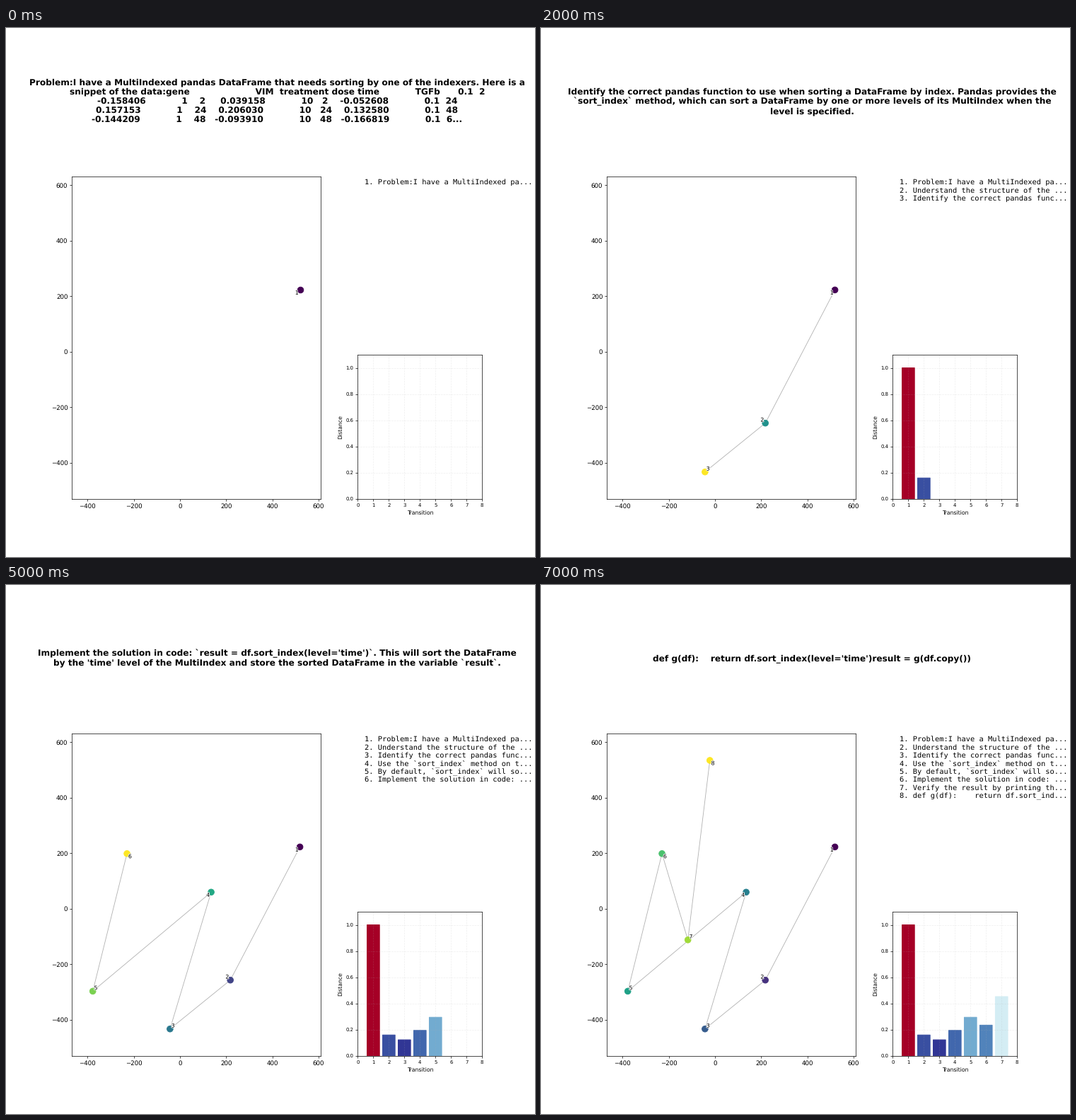
Animation of 748x748 px, one loop 8000 ms. Source, as a matplotlib script:

```python
import matplotlib.pyplot as plt
import matplotlib.patheffects as pe
import numpy as np
from matplotlib.animation import FuncAnimation

SIZE, INCHES = 748, 12

plt.rcParams["font.family"] = "DejaVu Sans"
plt.rcParams["text.hinting"] = "none"


def spaced(*parts):
    """Join words with the given numbers of spaces between them."""
    return "".join(" " * p if isinstance(p, int) else p for p in parts)


PROBLEM = "\n".join([
    "Problem:I have a MultiIndexed pandas DataFrame that needs sorting by "
    "one of the indexers. Here is a",
    spaced("snippet of the data:gene", 22, "VIM", 2, "treatment dose time",
           12, "TGFb", 6, "0.1", 2, "2"),
    spaced("-0.158406", 12, "1", 4, "2", 5, "0.039158", 12, "10", 3, "2", 4,
           "-0.052608", 12, "0.1", 2, "24"),
    spaced("0.157153", 12, "1", 4, "24", 4, "0.206030", 12, "10", 3, "24", 4,
           "0.132580", 12, "0.1", 2, "48"),
    spaced("-0.144209", 12, "1", 4, "48", 3, "-0.093910", 12, "10", 3, "48",
           3, "-0.166819", 12, "0.1", 2, "6..."),
])

STEPS = [
    PROBLEM,
    "Understand the structure of the DataFrame. We have a DataFrame with a "
    "MultiIndex composed of three\n"
    "levels: 'treatment', 'dose', and 'time'. We need to sort the DataFrame "
    "based on the 'time' index, in\n"
    "ascending order.",
    "Identify the correct pandas function to use when sorting a DataFrame by "
    "index. Pandas provides the\n"
    "`sort_index` method, which can sort a DataFrame by one or more levels "
    "of its MultiIndex when the\n"
    "level is specified.",
    "Use the `sort_index` method on the DataFrame. Specify `level='time'` to "
    "sort by the 'time' level of\n"
    "the MultiIndex. This will sort the DataFrame based on the 'time' index "
    "level.",
    "By default, `sort_index` will sort in ascending order, which matches "
    "our requirement. Additionally,\n"
    "because `sort_index` is stable, it will maintain the original order of "
    "elements with the same 'time'\n"
    "index.",
    "Implement the solution in code: `result = df.sort_index(level='time')`. "
    "This will sort the DataFrame\n"
    "by the 'time' level of the MultiIndex and store the sorted DataFrame in "
    "the variable `result`.",
    "Verify the result by printing the sorted DataFrame. We check that the "
    "rows now appear in the\n"
    "ascending order of the 'time' level and that no data was lost in the "
    "process.",
    "def g(df):    return df.sort_index(level='time')result = g(df.copy())",
]

POINTS = np.array([(519, 223), (218, -257), (-43, -433), (135, 60),
                   (-377, -297), (-229, 199), (-117, -112), (-22, 535)])
SIDES = [(-1, -1), (-1, 1), (1, 1), (-1, -1), (1, 1), (1, -1), (1, 1), (1, -1)]
DISTANCES = np.array([1, 0.159, 0.122, 0.194, 0.294, 0.234, 0.452])
N = len(STEPS)

fig = plt.figure(figsize=(INCHES, INCHES), dpi=(SIZE + 1e-6) / INCHES)


def add_axes(left, top, right, bottom):
    """Axes from pixel edges measured from the top left corner."""
    return fig.add_axes([left / SIZE, 1 - bottom / SIZE,
                         (right - left) / SIZE, (bottom - top) / SIZE])


def put_text(x, y, s, **kw):
    return fig.text(x / SIZE, 1 - y / SIZE, s, **kw)


# Path of the steps
ax = add_axes(93.4, 210, 444.9, 665.7)
low, high = POINTS.min(axis=0), POINTS.max(axis=0)
pad = 0.1 * (high - low)
ax.set_xlim(low[0] - pad[0], high[0] + pad[0])
ax.set_ylim(low[1] - pad[1], high[1] + pad[1])
line, = ax.plot([], [], color="black", alpha=0.3, lw=1, zorder=1)
dots = ax.scatter([], [], s=100, zorder=3)
halo = [pe.withStroke(linewidth=2, foreground="white")]
labels = [
    ax.annotate(str(k + 1), p, xytext=(5 * dx, 5 * dy),
                textcoords="offset points", ha="center", va="center",
                fontsize=9, path_effects=halo, zorder=4)
    for k, (p, (dx, dy)) in enumerate(zip(POINTS, SIDES))
]

# Distance bars
bar_ax = add_axes(497.4, 462, 673.2, 665.7)
norm = plt.Normalize(DISTANCES.min(), DISTANCES.max())
colors = plt.cm.RdYlBu_r(norm(DISTANCES))
bars = bar_ax.bar(range(1, N), DISTANCES, color=colors, edgecolor=colors,
                  linewidth=1.2, snap=False)
for bar in bars:
    bar.set_joinstyle("round")
bar_ax.set_xlim(0, N)
bar_ax.set_ylim(0, 1.1)
bar_ax.set_xticks(range(N + 1))
bar_ax.set_yticks(np.arange(0, 1.1, 0.2))
bar_ax.tick_params(labelsize=8)
bar_ax.grid(linestyle="--", alpha=0.2)
bar_ax.set_xlabel("Transition", fontsize=9)
bar_ax.set_ylabel("Distance", fontsize=9)

# Heading and list of steps
heading = put_text(383.4, 104, "", ha="center", va="center", fontsize=14,
                   fontweight="bold")
rows = [
    put_text(507, 221.4 + 11.33 * k, f"{k + 1}. {step[:32]}...",
             family="DejaVu Sans Mono", fontsize=12)
    for k, step in enumerate(STEPS)
]


def draw(i):
    n = i + 1
    heading.set_text(STEPS[i])
    line.set_data(*POINTS[:n].T)
    dots.set_offsets(POINTS[:n])
    dots.set_facecolor(plt.cm.viridis(np.linspace(0, 1, n)))
    dots.set_edgecolor("face")
    for k in range(N):
        labels[k].set_visible(k < n)
        rows[k].set_visible(k < n)
    for k, bar in enumerate(bars):
        bar.set_visible(k < i)
    return []


anim = FuncAnimation(fig, draw, frames=N, init_func=lambda: draw(0),
                     interval=1000, repeat=True, repeat_delay=0, blit=False)
plt.show()
```
